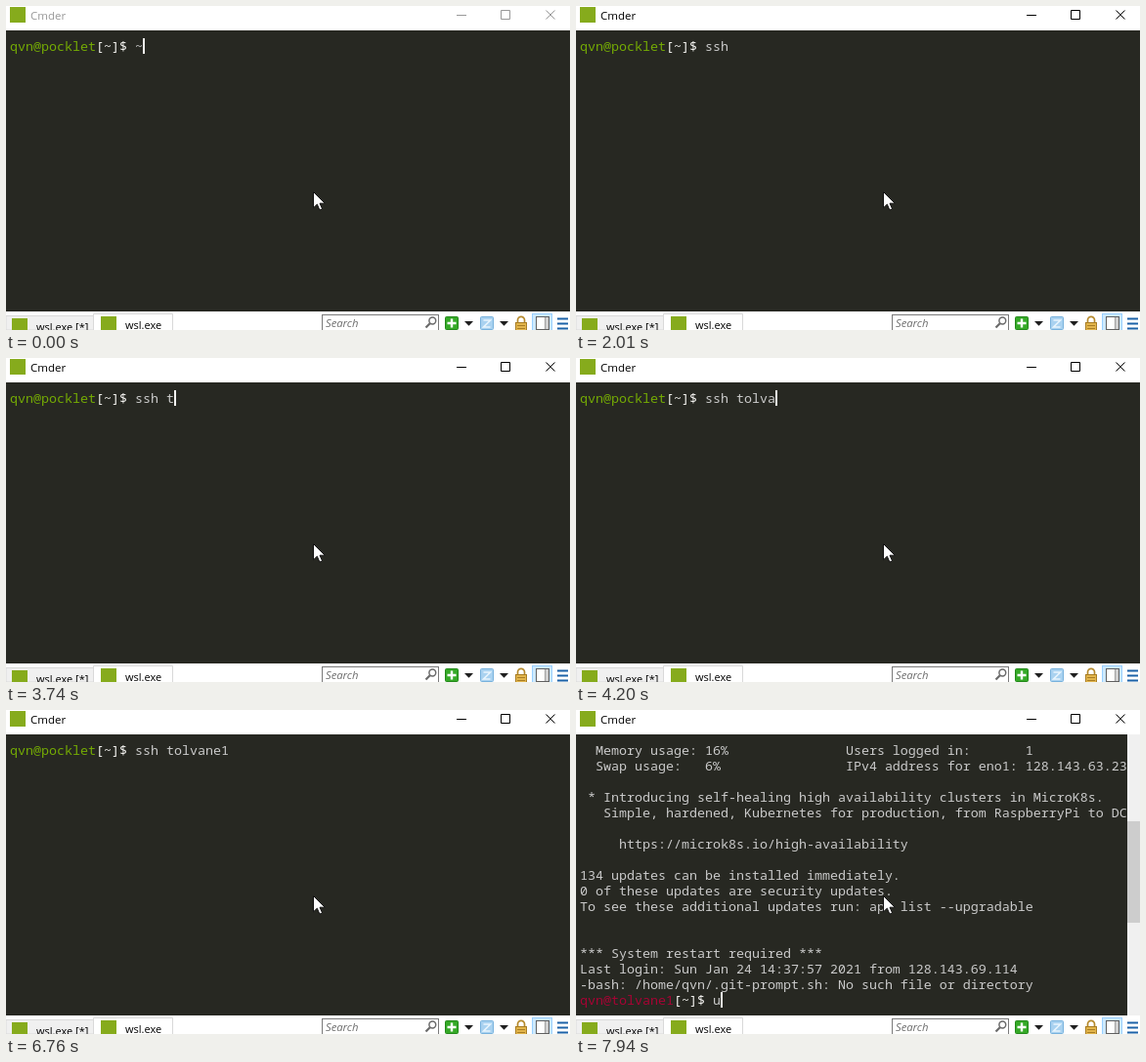
Animation of 577 by 332 pixels, one loop 8 s. Source, as an HTML page:

```html
<!DOCTYPE html>
<html lang="en">
<head>
<meta charset="utf-8">
<title>Terminal session</title>
<style>
  html, body { margin: 0; width: 100%; height: 100%; overflow: hidden; background: #fff; }
  svg { display: block; width: 577px; height: 332px; }
  text { white-space: pre; }
  .term { font: 13.3333px "Noto Sans Mono", "DejaVu Sans Mono", monospace; fill: #cacaca; }
  .ui { font: 11px "Open Sans", "Noto Sans", sans-serif; fill: #000; }
  .local { fill: #74aa04; }
  .remote { fill: #a70334; }
  .path { fill: #f9f8f5; }
</style>
</head>
<body>
<svg viewBox="0 0 577 332" xmlns="http://www.w3.org/2000/svg">
  <rect width="577" height="332" fill="#fff"/>

  <!-- title bar -->
  <rect x="4" y="1" width="16" height="16" fill="#86ab1c"/>
  <text id="title" class="ui" x="25" y="14" style="font-size:11.5px">Cmder</text>
  <path id="buttons" d="M461 9.5h10M506.5 4.5h9v9h-9zM552.5 4.5l9 9M561.5 4.5l-9 9" fill="none"/>

  <!-- terminal -->
  <rect y="25" width="577" height="288" fill="#272822"/>
  <g id="screen" class="term"></g>
  <rect id="caret" width="2" height="16" fill="#f4f4f0"/>
  <g id="scrollbar">
    <rect x="564" y="25" width="13" height="288" fill="#f0f0f0"/>
    <rect x="564" y="114" width="13" height="104" fill="#cdcdcd"/>
  </g>

  <!-- tabs -->
  <rect y="313" width="577" height="19" fill="#fff"/>
  <path d="M0 317.5H89.5V332H0z" fill="#f0f0f0" stroke="#d9d9d9"/>
  <path d="M89.5 332V315.5H170.5V332" fill="#fff" stroke="#d9d9d9"/>
  <rect x="6" y="320" width="16" height="16" fill="#86ab1c"/>
  <rect x="97" y="318" width="16" height="16" fill="#86ab1c"/>
  <text class="ui" x="31" y="333">wsl.exe [*]</text>
  <text class="ui" x="122" y="331">wsl.exe</text>

  <!-- toolbar -->
  <rect x="323.5" y="316.5" width="119" height="17" fill="#fff" stroke="#7a7a7a"/>
  <text class="ui" x="327" y="329" style="font-size:11.3px;font-style:italic;fill:#6d6d6d">Search</text>
  <g fill="none" stroke="#6a6a6a">
    <circle cx="436.3" cy="322.5" r="3.4" stroke-width="1.5"/>
    <path d="M433.7 325.2l-4.2 4.3" stroke-width="2.2"/>
  </g>
  <rect x="449.5" y="318.5" width="13" height="13" rx="1" fill="#35a927" stroke="#23891a"/>
  <path d="M456 320.5v9M451.5 325h9" stroke="#fff" stroke-width="2.4"/>
  <path d="M469 323h9l-4.5 4.7zM505 323h9l-4.5 4.7z" fill="#1e1e1e"/>
  <rect x="485.5" y="318.5" width="13" height="13" rx="1" fill="#a9d2f0" stroke="#78b2dd"/>
  <path d="M488.5 322h7l-7 7h7" fill="none" stroke="#e9f5fd" stroke-width="1.6"/>
  <path d="M523.5 325v-3.2a3.5 3.5 0 0 1 7 0v3.2" fill="none" stroke="#b58a2c" stroke-width="1.7"/>
  <rect x="521.5" y="324.5" width="11" height="8" fill="#e2b54c" stroke="#a87d24"/>
  <path d="M523 327.5h8M523 330.5h8" stroke="#a87d24"/>
  <rect x="538.5" y="315.5" width="20" height="18" fill="#cce8ff" stroke="#99d1ff"/>
  <rect x="542.5" y="318.5" width="13" height="13" fill="#fff" stroke="#606060"/>
  <path d="M551.5 319v12" stroke="#a0a0a0"/>
  <rect x="552" y="319" width="3" height="12" fill="#d0d0d0"/>
  <path d="M564 320.5h11M564 325.5h11M564 330.5h11" stroke="#1c62a8" stroke-width="2"/>

  <!-- mouse pointer -->
  <path d="M314.5 190.5v16.3l3.8-3.6 2.6 5.9 2.7-1.2-2.6-5.7h5.3z" fill="#fff" stroke="#111"/>
</svg>
<script>
  const LOOP = 8000, CELL = 8, LEFT = 4, TOP = 33, ROW = 16;
  const USER = "qvn", HERE = "pocklet", THERE = "tolvane1";
  const COMMAND = "ssh " + THERE;
  const FOCUS = 450, ENTER = 5130, LOGIN = 7240;

  const output = [
    "  Memory usage: 16%               Users logged in:       1",
    "  Swap usage:   6%                IPv4 address for eno1: 128.143.63.23",
    "",
    " * Introducing self-healing high availability clusters in MicroK8s.",
    "   Simple, hardened, Kubernetes for production, from RaspberryPi to DC",
    "",
    "     https://microk8s.io/high-availability",
    "",
    "134 updates can be installed immediately.",
    "0 of these updates are security updates.",
    "To see these additional updates run: apt list --upgradable",
    "",
    "",
    "*** System restart required ***",
    "Last login: Sun Jan 24 14:37:57 2021 from 128.143.69.114",
    `-bash: /home/${USER}/.git-prompt.sh: No such file or directory`
  ];

  // When each letter of the command, the space included, appears
  const keyTimes = [1160, 1310, 1385, 1460, 3740, 3890, 3970, 4050, 4200, 4740, 4820, 5050];
  // Spans in which the caret is dark
  const darkSpans = [[450, 760], [2010, 2490], [3040, 3590], [4660, 4740],
                     [5680, 6210], [6760, 7240], [7770, 7940]];

  const el = id => document.getElementById(id);
  const screen = el("screen"), caret = el("caret");

  function line(row, str, cls = "", col = 0) {
    return `<text class="${cls}" x="${LEFT + col * CELL}" y="${TOP + row * ROW + 13}">${str}</text>`;
  }

  function prompt(row, host, cls, typed) {
    const who = `${USER}@${host}`, end = who.length + 5;
    return {
      end: end + typed.length,
      markup: line(row, who, cls) + line(row, "[~]$", "path", who.length) + line(row, typed, "", end)
    };
  }

  function stateAt(t) {
    if (t >= LOGIN) {
      const p = prompt(output.length, THERE, "remote", t >= 7940 ? "u" : "");
      return { markup: output.map((s, i) => line(i, s)).join("") + p.markup, col: p.end, row: output.length };
    }
    const count = keyTimes.filter(k => k <= t).length;
    const p = prompt(0, HERE, "local", t < 760 ? "~" : COMMAND.slice(0, count));
    return { markup: p.markup, col: t >= ENTER ? 0 : p.end, row: t >= ENTER ? 1 : 0 };
  }

  let shown = "";
  function draw(t) {
    const s = stateAt(t);
    if (s.markup !== shown) screen.innerHTML = shown = s.markup;
    caret.setAttribute("x", LEFT + s.col * CELL);
    caret.setAttribute("y", TOP + s.row * ROW);
    const dark = darkSpans.some(([from, to]) => t >= from && t < to);
    caret.setAttribute("visibility", dark ? "hidden" : "visible");
    el("scrollbar").setAttribute("visibility", t >= LOGIN ? "visible" : "hidden");
    const ink = t < FOCUS ? "#999" : "#000";
    el("title").style.fill = ink;
    el("buttons").setAttribute("stroke", ink);
  }

  const start = performance.now();
  function tick() {
    draw((performance.now() - start) % LOOP);
    requestAnimationFrame(tick);
  }
  tick();
</script>
</body>
</html>
```
